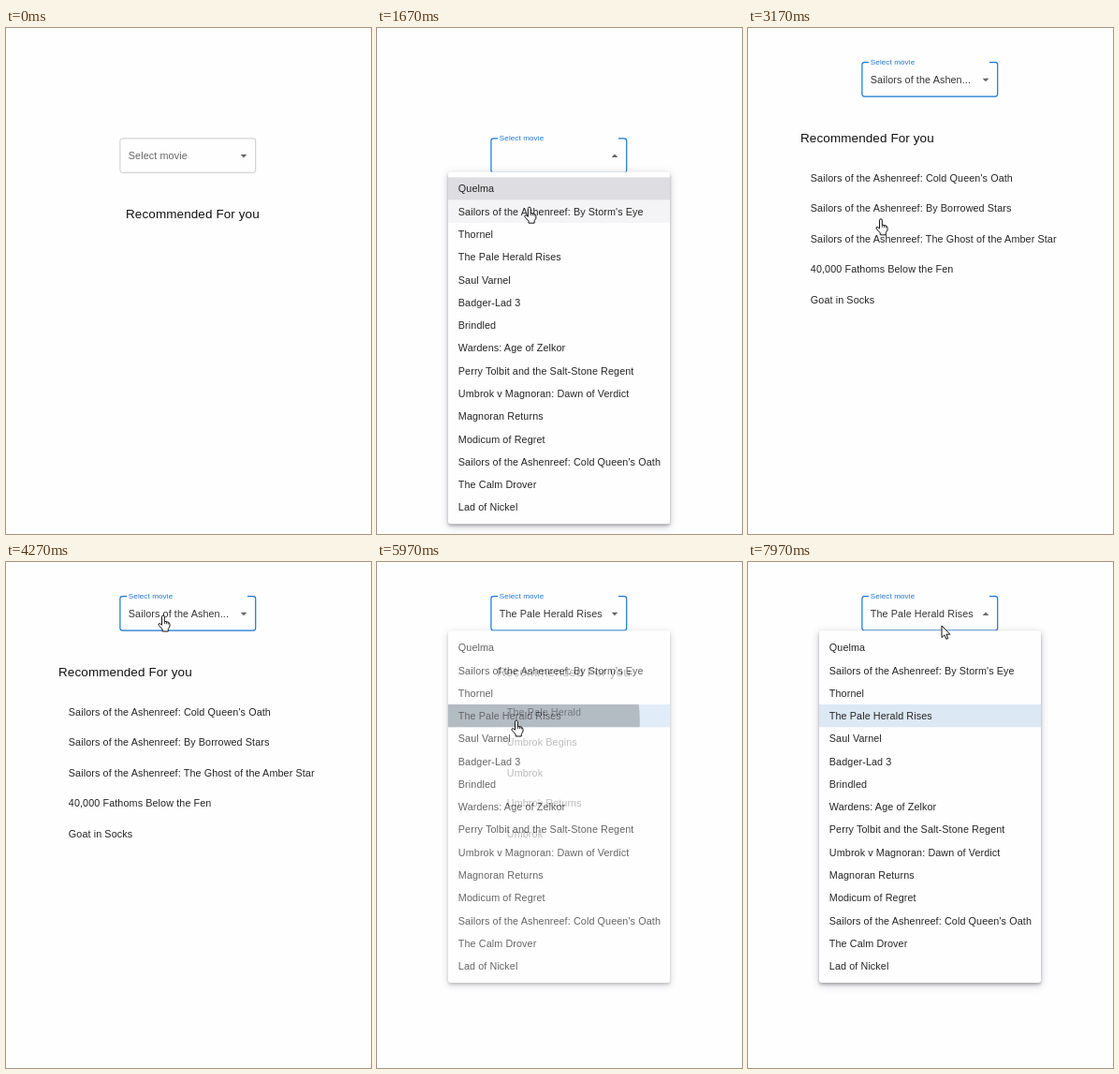
Animation of 390 by 540 pixels, one loop 8 s. Source, as an HTML page:

```html
<!DOCTYPE html>
<html lang="en">
<head>
<meta charset="utf-8">
<title>Movie recommender</title>
<style>
html, body { margin: 0; width: 100%; height: 100%; overflow: hidden; background: #fefefe; }
svg { display: block; width: 390px; height: 540px; font: 10.79px "Liberation Sans", Arial, sans-serif; letter-spacing: .101px; }
.paper { filter: drop-shadow(0 2px 1.5px rgba(0, 0, 0, .25)) drop-shadow(0 2px 4.5px rgba(30, 30, 70, .22)); }
</style>
</head>
<body>
<svg id="stage" viewBox="0 0 390 540"></svg>
<script>
const LOOP = 8000, ROW = 24.28, PAD = 6, MENU_W = 237, MENU_H = 375.8, MENU_X = 194.5;
const FADE = 330, GROW = 220, SHIFT = 81.2, FIRST_OPEN = 734;
const BLUE = '#1976d2', INK = '#242424';
const SERIES = 'Sailors of the Ashenreef: ';
const MOVIES = [
  'Quelma', SERIES + "By Storm's Eye", 'Thornel', 'The Pale Herald Rises', 'Saul Varnel',
  'Badger-Lad 3', 'Brindled', 'Wardens: Age of Zelkor', 'Perry Tolbit and the Salt-Stone Regent',
  'Umbrok v Magnoran: Dawn of Verdict', 'Magnoran Returns', 'Modicum of Regret',
  SERIES + "Cold Queen's Oath", 'The Calm Drover', 'Lad of Nickel'
];
const RESULTS = [
  { from: 0, value: '', x: 128, list: [] },
  { from: 2515, value: 'Sailors of the Ashen...', x: 56, list: [
    SERIES + "Cold Queen's Oath", SERIES + 'By Borrowed Stars', SERIES + 'The Ghost of the Amber Star',
    '40,000 Fathoms Below the Fen', 'Goat in Socks'] },
  { from: 5905, value: MOVIES[3], x: 128, list: [
    'The Pale Herald', 'Umbrok Begins', 'Umbrok', 'Umbrok Returns', 'Umbrok'] }
];
const MENUS = [
  { open: FIRST_OPEN, press: 2200, close: 2490, top: 153.4, sel: 0, pick: 1, tint: '#dedee2' },
  { open: 4300, press: 5700, close: 5880, top: 73.2, sel: 1, pick: 3, tint: '#e9f2fa' },
  { open: 7550, press: 9000, close: 9000, top: 73.2, sel: 3, pick: 3, tint: '#dce8f4' }
];
// Pointer tip: time, x, y
const PATH = [
  [30, 374, 215], [640, 185, 143], [1000, 185, 143], [1500, 168, 188], [2100, 142, 204],
  [3150, 142, 204], [4100, 168, 57], [4450, 168, 57], [5030, 206, 141], [5600, 149, 169],
  [6750, 149, 169], [7420, 207, 68], [8000, 207, 68]
];

const stage = document.getElementById('stage');

function set(el, attrs) {
  for (const k in attrs) el.setAttribute(k, attrs[k]);
  return el;
}
function add(parent, tag, attrs, text) {
  const el = set(document.createElementNS('http://www.w3.org/2000/svg', tag), attrs || {});
  if (text) el.textContent = text;
  return parent.appendChild(el);
}
const clamp = v => Math.min(1, Math.max(0, v));
const mix = (a, b, p) => a + (b - a) * p;
const smooth = p => p * p * (3 - 2 * p);

// cubic-bezier(.4, 0, .2, 1)
function ease(x) {
  x = clamp(x);
  let lo = 0, hi = 1, u = x;
  for (let i = 0; i < 20; i++) {
    const v = 1 - u;
    if (1.2 * v * v * u + .6 * v * u * u + u * u * u < x) lo = u; else hi = u;
    u = (lo + hi) / 2;
  }
  return u * u * (3 - 2 * u);
}

// Page
const page = add(stage, 'g');
const border = add(page, 'path', { fill: 'none' });
const label = add(page, 'text', { x: 130.8 }, 'Select movie');
const value = add(page, 'text', { x: 130.8, y: 140.2, fill: '#333' });
const caret = add(page, 'path', { fill: '#666' });
const heading = add(page, 'text', { y: 202.8, 'font-size': 13.49, fill: '#111' }, 'Recommended For you');
const results = Array.from({ length: 5 }, (_, i) =>
  add(page, 'text', { y: 245.2 + 32.38 * i, fill: INK }));

// Menu, with its origin at the top centre
const left = -MENU_W / 2;
const menu = add(stage, 'g');
add(menu, 'rect', { class: 'paper', x: left, width: MENU_W, height: MENU_H, rx: 2.7, fill: '#fefefe' });
const bar = () => add(menu, 'rect', { x: left, width: MENU_W, height: ROW });
const selBar = bar(), hoverBar = set(bar(), { fill: '#f4f4f6' });
const clip = add(add(add(stage, 'defs'), 'clipPath', { id: 'rowClip' }), 'rect',
  { x: left, width: MENU_W, height: ROW });
const ripple = add(add(menu, 'g', { 'clip-path': 'url(#rowClip)' }), 'circle', { fill: '#222', opacity: .36 });
MOVIES.forEach((m, i) => add(menu, 'text',
  { x: left + 10.8, y: PAD + ROW * (i + .5) + 3.9, fill: INK }, m));

// Pointers
const outline = { fill: '#fefefe', stroke: '#111', 'stroke-width': 1, 'stroke-linejoin': 'round' };
const arrow = add(stage, 'path', { ...outline, d: 'M0 0V12.6L2.9 9.9 4.9 14.3 6.8 13.5 4.9 9.2H8.8Z' });
const hand = add(stage, 'g');
add(hand, 'path', { ...outline, d: 'M-1.5 1.4a1.4 1.4 0 0 1 2.8 0V6.3L5.4 7.2Q7 7.7 7 9.6V12L5.3 14.5V17H-.8V15L-4.9 10.4Q-5.6 8.6-3.6 8.6L-1.5 10.2Z' });
add(hand, 'path', { d: 'M1.3 6.3V9M3.4 6.9V9.2M5.3 7.3V9.5', stroke: '#111', 'stroke-width': .8, fill: 'none' });

function pointerAt(t) {
  const i = Math.max(1, PATH.findIndex(k => k[0] > t));
  const [a, b] = [PATH[i - 1], PATH[i]];
  const p = smooth(clamp((t - a[0]) / (b[0] - a[0])));
  return [mix(a[1], b[1], p), mix(a[2], b[2], p)];
}

function drawField(t, shift, isOpen) {
  const float = ease((t - FIRST_OPEN) / 135);
  const active = t >= FIRST_OPEN;
  const gap = mix(129, 258, clamp((t - 870) / 100));
  set(border, {
    d: `M${gap} 117.9H264.2a2.5 2.5 0 0 1 2.5 2.5V151.8a2.5 2.5 0 0 1-2.5 2.5H124.4a2.5 2.5 0 0 1-2.5-2.5V120.4a2.5 2.5 0 0 1 2.5-2.5H129`,
    stroke: active ? BLUE : '#c4c4c4', 'stroke-width': active ? 1.2 : .9
  });
  set(label, {
    y: mix(139.9, 120.4, float), 'font-size': mix(10.79, 8.09, float),
    fill: active ? BLUE : '#666'
  });
  caret.setAttribute('d', isOpen ? 'M250.6 138.1L254 134.6 257.4 138.1Z' : 'M250.6 135L254 138.5 257.4 135Z');
  page.setAttribute('transform', `translate(0 ${-shift})`);
}

function drawMenu(m, t, x, y, hoverRow) {
  const closing = t >= m.close;
  const since = t - (closing ? m.close : m.open);
  const alpha = closing ? 1 - ease(since / FADE) : ease(since / FADE);
  const grow = closing ? 1 - ease((since - FADE / 3) / GROW) : ease(since / GROW);
  set(menu, {
    opacity: alpha,
    transform: `translate(${MENU_X} ${m.top}) scale(${mix(.75, 1, grow)} ${mix(.5625, 1, grow)})`
  });
  const pressed = t >= m.press;
  const rowY = i => PAD + ROW * i;
  set(selBar, { y: rowY(pressed ? m.pick : m.sel), fill: pressed ? '#d4e5f6' : m.tint });
  set(hoverBar, { y: rowY(hoverRow), opacity: hoverRow < 0 || hoverRow === m.sel || pressed ? 0 : 1 });
  clip.setAttribute('y', rowY(m.pick));
  set(ripple, {
    cx: x - MENU_X, cy: y - m.top,
    r: pressed ? 172 * ease((t - m.press) / 550) : 0
  });
}

function draw(t) {
  const [x, y] = pointerAt(t);
  const res = RESULTS.filter(r => t >= r.from).pop();
  const shift = res.list.length ? SHIFT : 0;
  const m = MENUS.find(k => t >= k.open && t < k.close + FADE);
  const isOpen = !!m && t < m.close;

  drawField(t, shift, isOpen);
  value.textContent = res.value;
  heading.setAttribute('x', res.x);
  results.forEach((el, i) => {
    el.setAttribute('x', res.x + 10.8);
    el.textContent = res.list[i] || '';
  });

  const row = m ? Math.floor((y - m.top - PAD) / ROW) : -1;
  const inMenu = !!m && row >= 0 && row < MOVIES.length && Math.abs(x - MENU_X) < MENU_W / 2;
  menu.style.display = m ? '' : 'none';
  if (m) drawMenu(m, t, x, y, inMenu ? row : -1);

  const top = 118 - shift;
  const onField = x > 122 && x < 267 && y > top && y < top + 37;
  const onList = shift && x > res.x && y > 144 && y < 306;
  const useHand = isOpen ? inMenu : inMenu || onField || onList;
  const shown = t >= 30;
  for (const [el, on] of [[arrow, !useHand], [hand, useHand]]) {
    el.style.display = shown && on ? '' : 'none';
    el.setAttribute('transform', `translate(${x} ${y})`);
  }
}

const start = performance.now();
function tick() {
  draw((performance.now() - start) % LOOP);
  requestAnimationFrame(tick);
}
tick();
</script>
</body>
</html>
```
